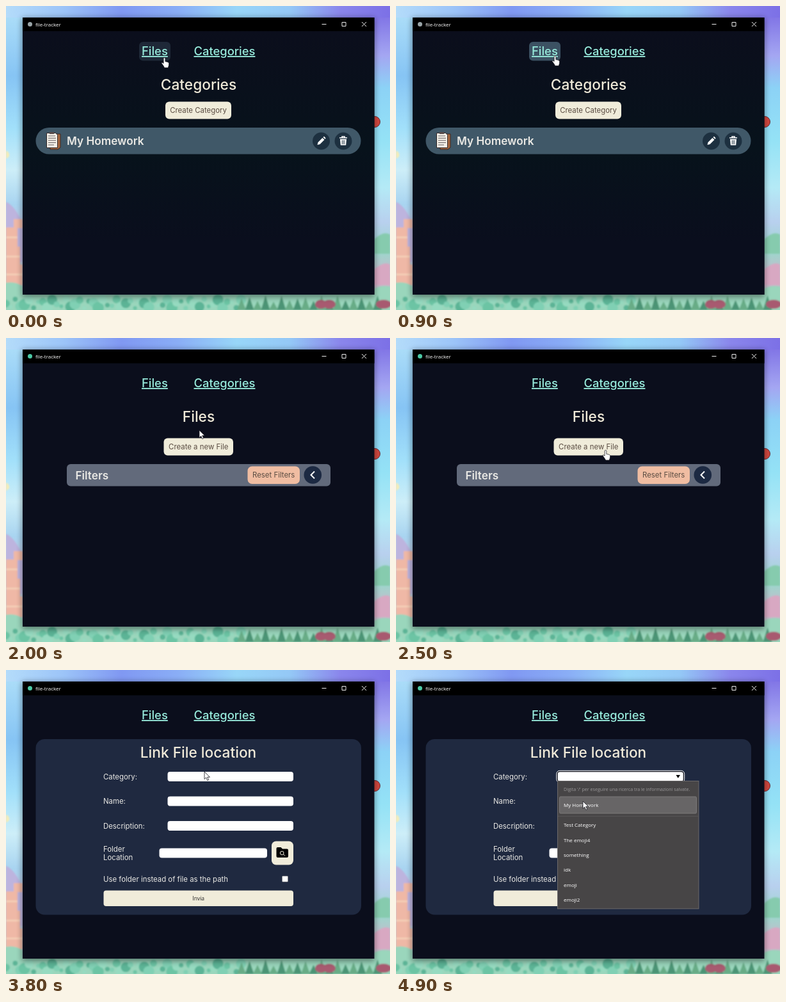
An HTML page that plays this animation: 600 px wide and 475 px high, repeating every 5000 ms.

```html
<!DOCTYPE html>
<html lang="en">
<head>
<meta charset="utf-8">
<title>file-tracker</title>
<style>
html, body { margin: 0; width: 100%; height: 100%; overflow: hidden; }
svg { display: block; width: 600px; height: 475px; }
text { font-family: Inter, "Open Sans", sans-serif; font-size: 11.4px; fill: #e9e8e4; }
.mid { text-anchor: middle; }
.nav { font-size: 18.4px; font-weight: 550; fill: #98ecdd; text-decoration: underline; }
.head { font-size: 22.7px; font-weight: 520; fill: #f0ead9; text-anchor: middle; }
.row { font-size: 17.2px; font-weight: 560; }
.dark { fill: #5a4c42; text-anchor: middle; }
.ui { font-family: "Open Sans", sans-serif; font-size: 8px; fill: #fff; }
.cream { fill: #f0ecda; }
</style>
</head>
<body>
<svg viewBox="0 0 600 475">
  <defs>
    <linearGradient id="top">
      <stop offset="0" stop-color="#b4dcfa"/><stop offset=".15" stop-color="#9cc4f8"/>
      <stop offset=".3" stop-color="#8098f2"/><stop offset=".45" stop-color="#8aaef6"/>
      <stop offset=".6" stop-color="#98d6f8"/><stop offset=".74" stop-color="#94c8f6"/>
      <stop offset=".87" stop-color="#8a86ec"/><stop offset="1" stop-color="#7c70e6"/>
    </linearGradient>
    <linearGradient id="left" x2="0" y2="1">
      <stop offset="0" stop-color="#aadcf8"/><stop offset=".2" stop-color="#86c4f4"/>
      <stop offset=".38" stop-color="#a2e0fa"/><stop offset=".52" stop-color="#cdeef8"/>
      <stop offset=".64" stop-color="#a8d4f0"/><stop offset=".74" stop-color="#c4c4e2"/>
      <stop offset="1" stop-color="#a9d2d0"/>
    </linearGradient>
    <linearGradient id="right" x2="0" y2="1">
      <stop offset="0" stop-color="#8276e6"/><stop offset=".13" stop-color="#a4a6f2"/>
      <stop offset=".24" stop-color="#8cd2f6"/><stop offset=".42" stop-color="#94e2f6"/>
      <stop offset=".58" stop-color="#b4eaf6"/><stop offset=".7" stop-color="#b8d0ee"/>
      <stop offset=".8" stop-color="#9cd6cc"/><stop offset=".9" stop-color="#d0b4cc"/>
      <stop offset="1" stop-color="#8ccab0"/>
    </linearGradient>
    <linearGradient id="page" x2="0" y2="1">
      <stop offset="0" stop-color="#0b0e1c"/><stop offset=".45" stop-color="#07121b"/>
      <stop offset=".8" stop-color="#0a0e1d"/>
    </linearGradient>
    <filter id="soft"><feGaussianBlur stdDeviation="1.200"/></filter>
    <filter id="shade" x="-10%" y="-10%" width="120%" height="120%"><feGaussianBlur stdDeviation="5"/></filter>
  </defs>

  <rect width="600" height="475" fill="url(#top)"/>
  <rect y="18" width="100" height="457" fill="url(#left)"/>
  <rect x="500" y="18" width="100" height="457" fill="url(#right)"/>
  <g id="land" filter="url(#soft)">
    <path d="M0 226q6 2 5 9l-5 4z" fill="#f4ecb8"/>
    <path d="M0 306q14 6 26 34v60H0z" fill="#bdb4de"/>
    <path d="M12 333h14v14H12zM0 346h18v30H0zM0 376h22v28H0zM0 404h26v32H0z" fill="#efb8a6"/>
    <path d="M0 360h18v3H0zM0 390h22v3H0zM0 418h26v3H0z" fill="#f4cdb6"/>
    <path d="M575 365q14-14 25-8v30h-25z" fill="#86cbae"/>
    <path d="M575 412q16-14 25-8v32h-25z" fill="#d8a8c2"/>
    <path d="M-5 434q17-6 31 4v12h549v-8q14-8 30-2v40H-5z" fill="#9ad6bc"/>
  </g>
  <circle cx="576" cy="181" r="8.500" fill="#d2483f" stroke="#6a2a34"/>

  <rect x="25" y="19" width="551" height="436" fill="#000" opacity=".42" filter="url(#shade)"/>
  <rect x="26" y="18" width="549.5" height="433" fill="#0b0e1c"/>
  <rect x="26" y="18" width="549.5" height="21.500"/>
  <circle id="badge" cx="37.500" cy="28.500" r="3.500"/>
  <text class="ui" x="46" y="31.500">file-tracker</text>
  <path d="M493.500 28.500h7M525 25.500h6v6h-6zM556 25l7 7m0-7l-7 7" fill="none" stroke="#eee"/>

  <g class="page">
    <rect x="26" y="39.500" width="549.5" height="411.500" fill="url(#page)"/>
    <text class="head" x="301" y="131">Categories</text>
    <rect class="cream" x="249" y="149.500" width="103" height="27" rx="6"/>
    <text class="dark" x="300.500" y="167">Create Category</text>
    <rect x="46.500" y="190" width="508" height="41.500" rx="20.700" fill="#405868"/>
    <path d="M68 200h17v21l-4 3H69z" fill="#a5673f" stroke="#3a2620"/>
    <path d="M63.500 198.500h14l3 3v20h-17z" fill="#f3efe6" stroke="#33292a"/>
    <path d="M66 203h11m-11 3.500h12m-12 3.500h12m-12 3.500h12m-12 3.500h9" stroke="#665e62"/>
    <path d="M68 197h7v3h-7z" fill="#574a4a"/>
    <text class="row" x="95" y="217">My Homework</text>
    <g fill="#1d3040"><circle cx="492.500" cy="211" r="13.500"/><circle cx="527" cy="211" r="13.500"/></g>
    <path d="M486.500 217l1-4 7-7 3 3-7 7zM495.500 205l1.500-1.200 2.600 2.600-1.200 1.500z" fill="#fff"/>
    <path d="M521 206h12m-8-.5v-1.500h4v1.500" fill="none" stroke="#fff" stroke-width="1.500"/>
    <path d="M522 208h10l-.8 9.500h-8.400z" fill="#fff"/>
    <path d="M525.200 209.500v6.500m1.800-6.500v6.500m1.800-6.500v6.500" stroke="#1d3040" stroke-width=".8"/>
  </g>

  <g class="page">
    <text class="head" x="301" y="131">Files</text>
    <rect class="cream" x="246.500" y="156.500" width="108.500" height="27" rx="6"/>
    <text class="dark" x="300.700" y="174">Create a new File</text>
    <rect x="95" y="197" width="412" height="34.500" rx="6" fill="#626a7b"/>
    <text class="row" x="108.500" y="221">Filters</text>
    <rect x="377.500" y="200.500" width="81.500" height="27.500" rx="7" fill="#f0bda2"/>
    <text class="dark" x="418.200" y="218">Reset Filters</text>
    <circle cx="479.300" cy="214" r="13.800" fill="#1c2942"/>
    <path d="M482 208.500l-5.500 5.500 5.500 5.500" fill="none" stroke="#fff" stroke-width="2"/>
  </g>

  <g class="page">
    <rect x="46.500" y="108" width="508.500" height="274.500" rx="14" fill="#1f2940"/>
    <text class="head" x="300.500" y="137">Link File location</text>
    <text x="152" y="170.500">Category:</text>
    <text x="152" y="209">Name:</text>
    <text x="152" y="247.500">Description:</text>
    <text x="152" y="284">Folder</text>
    <text x="152" y="297">Location</text>
    <text x="152" y="330.500">Use folder instead of file as the path</text>
    <g fill="#fff">
      <rect x="252.500" y="159" width="196.500" height="15" rx="4"/>
      <rect x="252.500" y="197.500" width="196.500" height="15" rx="4"/>
      <rect x="252.500" y="236" width="196.500" height="15" rx="4"/>
      <rect x="239.500" y="278.500" width="168.500" height="15" rx="4"/>
      <rect x="431.500" y="322" width="9" height="9" rx="1" stroke="#777" stroke-width=".6"/>
    </g>
    <rect class="cream" x="415" y="267.500" width="34" height="37" rx="7"/>
    <path d="M422.500 279q0-2 2-2h5l2.500 2.500h7q2 0 2 2V291q0 2-2 2h-14.500q-2 0-2-2z"/>
    <path d="M433.500 288l2.500 2.500M434 286a2.800 2.800 0 1 1-5.600 0 2.800 2.800 0 1 1 5.600 0z" fill="none" stroke="#f0ecda"/>
    <rect class="cream" x="152.500" y="344.500" width="296.500" height="24.500" rx="4"/>
    <text class="ui mid" x="300.700" y="360" style="font-size:8.500px;fill:#222">Invia</text>
  </g>

  <g id="list">
    <rect x="252" y="158.500" width="197.500" height="16" rx="4" fill="#fff" stroke="#10131c" stroke-width="1.500"/>
    <rect x="250.800" y="157.300" width="199.900" height="18.400" rx="5" fill="none" stroke="#fff"/>
    <path d="M437.500 164h6.500l-3.250 5z"/>
    <rect x="252.500" y="173.500" width="220.500" height="199.500" fill="#474546" stroke="#6b696a"/>
    <text class="ui" x="262" y="189" style="font-size:7.100px;fill:#9b999a">Digita '/' per eseguire una ricerca tra le informazioni salvate.</text>
    <rect id="pick" x="255.500" y="198" width="214" height="26" rx="1.500" fill="#676566" stroke="#7c7a7b"/>
    <path d="M253 228.500h219.500" stroke="#565455"/>
  </g>

  <g id="links">
    <rect id="hover" x="208" y="56" width="49" height="29.500" rx="6" fill="#3c5263"/>
    <text class="nav" x="212" y="77">Files</text>
    <text class="nav" x="293.500" y="77">Categories</text>
  </g>

  <g id="cursor" fill="#fff" stroke="#15151c" stroke-width=".8" stroke-linejoin="round">
    <path id="arrow" d="M0 0v11.500l2.700-2.500 2 4.500 2-.9-2-4.300h3.800z"/>
    <path id="hand" transform="translate(.5 .8) scale(.92)" d="M-1.500 1q0-1.500 1.500-1.500t1.500 1.500v5l1.800.2 1.900.5 1.700.8q1 .6.900 2l-.4 3.500-1.200 3.500h-6l-1.700-3-3.200-4.500q-.5-1.500 1-1.500l2.200 1.500z"/>
  </g>
</svg>
<script>
const $ = id => document.getElementById(id);
const pages = document.querySelectorAll('.page');

function add(parent, tag, attrs, text = '') {
  const el = document.createElementNS('http://www.w3.org/2000/svg', tag);
  for (const k in attrs) el.setAttribute(k, attrs[k]);
  el.textContent = text;
  parent.append(el);
}

// Bushes and pines along the bottom edge
const greens = ['#6cc4a4', '#80d0b4', '#5cb496', '#96dac0'];
for (let i = 0; i < 52; i++)
  add($('land'), 'circle', { cx: i * 7.2, cy: 465 + 7 * Math.sin(i * 2.3), r: 6 + 3 * Math.sin(i * 5.1), fill: greens[i * 7 % 4] });
for (let i = 0; i < 18; i++) {
  const x = 368 + i * 12.500, h = 18 + 5 * Math.sin(i * 2.7);
  add($('land'), 'path', { d: `M${x} ${475 - h}l7 ${h}h-14z`, fill: i % 2 ? '#4c9474' : '#68ac86' });
}
for (const [x, r] of [[492, 9], [505, 10], [590, 12]])
  add($('land'), 'ellipse', { cx: x, cy: 466, rx: r, ry: 7, fill: '#a85a70' });

['My Homework', 'Test Category', 'The emoji4', 'something', 'idk', 'emoji', 'emoji2'].forEach((s, i) =>
  add($('list'), 'text', { class: 'ui', x: 262, y: i ? 221.700 + 23.400 * i : 213.500 }, s));

// Pointer tip: time, x, y
const path = [[0, 247, 80.500], [600, 248, 77.500], [1500, 248, 77.500], [2300, 327, 175],
  [3200, 327, 175], [3800, 310, 159], [4300, 310, 160], [4800, 292, 205], [5000, 292, 205]];

function tip(t) {
  const i = path.findIndex(p => p[0] > t);
  const [t0, x0, y0] = path[i - 1], [t1, x1, y1] = path[i];
  const u = (t - t0) / (t1 - t0), e = u * u * (3 - 2 * u);
  return [x0 + (x1 - x0) * e, y0 + (y1 - y0) * e];
}

const show = (el, on) => el.style.display = on ? '' : 'none';

function draw(now) {
  const t = Math.floor(now % 5000 / 100) * 100;
  const page = t < 1200 ? 0 : t < 2800 ? 1 : 2;
  const [x, y] = tip(t);
  const onLink = x < 257 && y < 85;
  const onButton = page === 1 && x > 246 && y > 156;
  pages.forEach((p, i) => show(p, i === page));
  show($('list'), t >= 4200);
  show($('pick'), y > 198);
  show($('hover'), onLink);
  $('hover').style.opacity = Math.min(1, .4 + t / 500);
  $('badge').style.fill = page ? '#4cc9a6' : '#9aa5a8';
  show($('hand'), onLink || onButton);
  show($('arrow'), !onLink && !onButton);
  $('cursor').setAttribute('transform', `translate(${x} ${y})`);
  requestAnimationFrame(draw);
}
requestAnimationFrame(draw);
</script>
</body>
</html>
```
